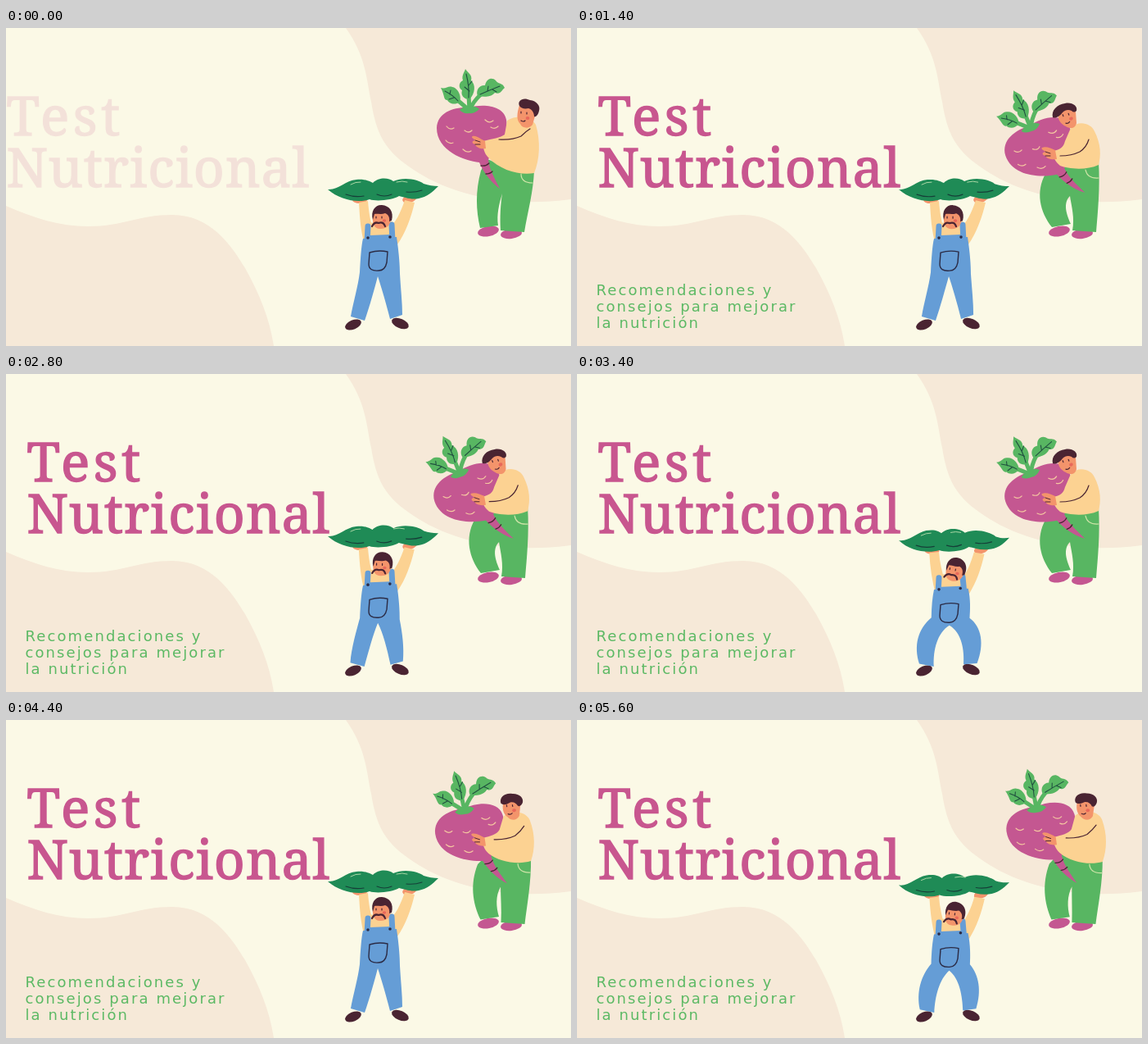
These frames come from a looping animation (690 by 388 pixels, 5700 ms). An HTML page with a canvas:

```html
<!DOCTYPE html>
<html lang="es">
<head>
<meta charset="utf-8">
<title>Test Nutricional</title>
<style>
  html, body { margin: 0; width: 100%; height: 100%; overflow: hidden; background: #fbf9e6; }
  canvas, svg { position: absolute; left: 0; top: 0; width: 690px; height: 388px; }
  #title { font: 500 66px "Noto Serif", serif; fill: #c8568f; stroke: #c8568f; stroke-width: 1.4px; letter-spacing: 1px; }
  #title .wide { letter-spacing: 4.4px; }
  #sub { font: 18px "DejaVu Sans", sans-serif; fill: #5cb964; letter-spacing: 2.1px; }
</style>
</head>
<body>
<canvas id="stage" width="690" height="388"></canvas>
<svg viewBox="0 0 690 388">
  <g id="title"><text class="wide" x="25.5" y="131">Test</text><text x="25.5" y="193.5">Nutricional</text></g>
  <g id="sub"><text x="23.5" y="326">Recomendaciones y</text><text x="23.5" y="346">consejos para mejorar</text><text x="23.5" y="365.5">la nutrición</text></g>
</svg>
<script>
const LOOP = 5700, STEP = 100;
const CREAM = '#fbf9e6', BEIGE = '#f6e9d8', GREEN = '#58b662', POD = '#1f8b56', PINK = '#c45791',
      BLUE = '#659dd6', YELLOW = '#fcd292', SKIN = '#f3946b', DARK = '#4a2432', INK = '#2b2b45';
const ctx = document.getElementById('stage').getContext('2d');
const title = document.getElementById('title'), sub = document.getElementById('sub');
let k = 0; // 0 standing, 1 crouching

const clamp = v => Math.min(1, Math.max(0, v));
const lerp = (a, b) => a + (b - a) * k;
const smooth = (a, b, v) => { const u = clamp((v - a) / (b - a)); return u * u * (3 - 2 * u); };
// sink, stay low, rise again
const squat = (t, period) => {
  const u = t % period / period;
  return smooth(.067, .474, u) - smooth(.763, .98, u);
};

// blend two path strings that share the same commands
function blend(a, b) {
  if (!b) return new Path2D(a);
  const num = /-?[\d.]+/g, to = b.match(num);
  let i = 0;
  return new Path2D(a.replace(num, v => (+v + (to[i++] - v) * k).toFixed(2)));
}
function fill(color, a, b) {
  ctx.fillStyle = color;
  ctx.fill(blend(a, b));
}
function line(color, width, a, b) {
  ctx.strokeStyle = color;
  ctx.lineWidth = width;
  ctx.stroke(blend(a, b));
}
function oval(color, x, y, rx, ry, turn = 0) {
  ctx.fillStyle = color;
  ctx.beginPath();
  ctx.ellipse(x, y, rx, ry, turn, 0, 7);
  ctx.fill();
}
// draw a rigid part around (x, y), moved by (dx, dy) and turned as k grows
function part(x, y, dx, dy, turn, draw) {
  ctx.save();
  ctx.translate(x + dx * k, y + dy * k);
  ctx.rotate(turn * k);
  ctx.translate(-x, -y);
  draw();
  ctx.restore();
}

function backdrop() {
  ctx.fillStyle = CREAM;
  ctx.fillRect(0, 0, 690, 388);
  fill(BEIGE, 'M415 0 C440 35 440 62 446 90 C452 128 462 148 492 169 C525 193 590 222 690 209 V0 Z');
  fill(BEIGE, 'M0 217 C35 232 65 242 100 242 C145 242 160 228 203 228 C250 228 275 265 292 293 C310 325 322 355 327 388 H0 Z');
}

function podMan() {
  oval(DARK, 424, 362, 10.5, 5.6, -.4);
  oval(DARK, 481.5, 360.5, 11, 5.8, .4);

  oval(SKIN, lerp(432, 434), lerp(210, 217.5), 9, 4);
  oval(SKIN, lerp(493, 494), lerp(208, 216), 9, 5, -.3);
  fill(YELLOW, 'M431 213 L442 211 C443 225 445 235 448 246 L438 264 C433 248 432 230 431 213 Z',
               'M430 220 L442 219 C443 232 446 244 450 256 L438 270 C434 255 431 238 430 220 Z');
  fill(YELLOW, 'M487 210 L499 213 C495 230 488 250 478 264 L466 246 C476 238 482 225 487 210 Z',
               'M484 220 L497 222 C493 240 488 255 479 270 L468 256 C476 245 481 232 484 220 Z');
  fill(YELLOW, 'M440 238 L472 236 L477 262 L436 262 Z', 'M440 247 L474 246 L478 268 L436 268 Z');

  fill(BLUE,
    'M436 257 L477 255 C480 275 481 290 481 300 C482 318 484 335 484 350 L469 355 C464 335 458 315 454 303 C450 318 444 340 438 357 L421 352 C424 335 430 315 432 298 C433 280 434 265 436 257 Z',
    'M436 265 L478 264 C481 275 480 287 479 297 C498 306 502 328 490 354 L473 354 C476 338 474 316 455 308 C437 315 432 335 435 357 L417 354 C407 330 412 310 433 297 C433 285 434 275 436 265 Z');
  fill(BLUE, 'M444 253 L469 252 L475 262 L438 262 Z', 'M445 262 L469 261 L476 270 L438 270 Z');
  line(BLUE, 7, 'M442 242 L441 261', 'M442 251 L441 269');
  line(BLUE, 7, 'M471 240 L472 260', 'M471 250 L473 268');
  line(INK, 1.4,
    'M444 274 Q455 270.5 466 273 L465 286 Q463 296 455 296 Q443 297 443 288 Z',
    'M444 284 Q455 280.5 466 283 L465 295 Q463 305 455 305.5 Q443 306 443 297 Z');
  oval(INK, 442, lerp(256, 265), 1.8, 1.8);
  oval(INK, lerp(469, 468), lerp(255, 263.5), 1.8, 1.8);

  part(459, 232, 4, 10.5, .25, () => {
    fill(SKIN, 'M448 228 C447 238 449 245 457 245 C466 245 470 240 470 230 L466 222 L452 222 Z');
    fill(DARK, 'M448 234 C445 223 451 215.5 459 216 C468 216.5 474 224 471 235 L468 236 C469 230 466 227 463 226 C458 228 453 226 450 227 Z');
    oval('#e8685a', 462, 235, 2.2, 1.8);
    line(DARK, 1.2, 'M452 230 l0 2 M459 230 l0 2');
    line(DARK, 2.2, 'M447 242 Q450 236 455 238 Q461 236 463 242');
  });

  fill(POD,
    'M393 197 C406 198 414 186 428 185 C438 184 444 187 448 189 C456 181 468 183 473 187 C486 181 504 185 510 190 C516 192 522 193 528 193 C520 201 514 206 504 208 C494 210 486 206 480 205 C472 210 452 212 444 209 C430 214 408 210 393 197 Z',
    'M393 205 C406 207 414 196 426 193 C436 191 441 193 444 196 C452 188 468 190 474 196 C486 190 504 195 512 201 C518 203 522 203 528 202 C520 211 512 216 502 216 C492 217 484 214 478 213 C470 219 450 220 442 217 C428 221 406 218 393 205 Z');
  line('#163f38', 1.2,
    'M415 203 Q426 207 437 205 M453 203 Q462 207 471 203 M489 200 Q499 201 508 198',
    'M414 211 Q425 215 436 212 M451 211 Q460 214 469 210 M486 208 Q496 210 506 207');
  line('#a9d6a4', 1, 'M421 191 Q427 187.5 433 188 M477 188 Q484 186 490 188',
                     'M420 199 Q426 196 432 196 M450 195 Q456 193.5 462 195');
}

function beet() {
  line(GREEN, 5, 'M566 101 Q560 95 550 87 M566 101 L565 82 M566 101 Q570 90 580 81');
  fill(GREEN, 'M554 90 C548 95 541 92 539 88 C534 88 536 82 531 73 C537 75 540 70 545 72 C552 73 557 84 554 90 Z');
  fill(GREEN, 'M566 87 C559 87 555 82 557 76 C552 73 553 66 558 64 C556 58 560 54 561 50 C564 55 570 57 568 64 C574 69 573 80 566 87 Z');
  fill(GREEN, 'M576 83 C573 75 579 69 585 70 C587 61 594 60 598 64 C601 69 606 66 609 73 C605 76 604 82 597 79 C592 85 583 84 576 83 Z');
  line('#20503f', 1.1, 'M536 77 Q546 82 552 89 M542 81 l1 -5 M547 85 l-6 2 M562 56 Q566 72 565 85 M565 70 l4 -5 M566 77 l-6 -5 M579 81 Q590 76 603 71 M588 77 l1 -6 M594 75 l5 3');
  fill(PINK, 'M566 97 C582 92 608 94 611 112 C614 130 602 148 589 160 C590 172 596 182 603 196 C592 188 583 176 578 164 C560 162 526 150 526 122 C527 102 548 96 566 97 Z');
  fill(GREEN, 'M554 100 Q560 95 566 96 Q573 94 578 99 Q572 105 566 104 Q558 105 554 100 Z');
  line('#f4c6a0', 1.2, 'M538 120 q4 5 9 2 M560 125 q5 4 9 0 M585 112 q5 5 10 1 M592 121 q5 3 9 -1 M537 137 q4 5 9 3 M558 148 q5 5 10 2');
  line(DARK, 1.3, 'M580 168 Q586 169 590 165 M586 178 Q591 178 594 175');
}

function beetMan() {
  oval(PINK, 589, 248, 13, 6.2, -.2);
  oval(PINK, 617, 251, 13, 6, -.12);
  fill(GREEN,
    'M588 160 C615 172 632 176 645 174 C644 200 637 225 633 249 L604 247 C603 230 604 215 606 202 C602 215 599 228 601 241 L579 244 C574 222 573 200 580 174 Z',
    'M590 166 C605 171 625 170 637 163 C639 195 636 225 634 249 L605 247 C608 232 604 218 602 205 C593 214 598 228 603 239 L580 243 C565 224 560 200 572 178 Z');
  line('#cfe4a8', 1.2, 'M629 178 Q629 189 643 189', 'M621 173 Q623 184 637 183');

  part(566, 100, -12, 22, -.33, beet);

  fill(YELLOW,
    'M612 113 C624 105 642 108 647 118 C653 138 652 160 645 177 C628 180 604 174 589 158 C584 153 582 146 583 138 C594 135 604 134 609 130 Z',
    'M603 122 C612 112 628 116 632 126 C640 142 640 155 637 167 C622 174 600 172 590 168 C584 163 580 156 582 150 C590 148 594 146 596 138 Z');
  line(DARK, 1.2, 'M640 123 Q635 126 629 132 Q618 137 602 136', 'M625 136 Q622 146 614 151 Q604 156 590 156');

  fill(SKIN,
    'M585 138 C580 136 575 131 570 132 C567 133 571 135 573 137 C568 138 569 141 573 142 C574 146 580 148 586 147 Z',
    'M584 149 C579 147 573 144 568 146 C566 148 570 149 572 151 C567 152 568 155 572 156 C574 160 580 161 586 160 Z');
  line(DARK, 1, 'M573 137 l6 2 M573 142 l6 0', 'M572 151 l6 2 M572 156 l6 0');

  fill(SKIN,
    'M627 94 C624 104 623 112 628 117 C630 122 638 124 643 118 L647 104 L643 94 Z',
    'M588 103 C586 110 590 117 597 120 C603 124 609 122 610 116 L609 102 L600 96 Z');
  fill(DARK,
    'M627 95 C624 88 632 84 640 88 C648 89 653 95 651 101 C650 106 647 109 645 108 C645 103 642 99 638 98 C633 99 629 98 627 95 Z',
    'M581 109 C579 101 586 93 596 92 C604 90 612 95 610 101 C608 103 606 103 604 101 C600 99 596 100 593 103 C590 107 585 111 581 109 Z');
  part(633, 108, -34, 2, -.35, () => {
    oval('#e8685a', 637, 110, 2.4, 2);
    line(DARK, 1.2, 'M629 102 l0 2 M636 103 l0 2 M629 113 q3 2 5 0');
  });
}

function enter(el, p, shift, from) {
  const e = 1 - (1 - clamp(p)) ** 2;
  el.setAttribute('transform', `translate(${(-shift * (1 - e)).toFixed(2)} 0)`);
  el.setAttribute('opacity', p < 0 ? 0 : from + (1 - from) * e);
}

function frame(now) {
  const t = Math.floor(now % LOOP / STEP) * STEP;
  ctx.lineCap = ctx.lineJoin = 'round';
  backdrop();
  k = squat(t, 1940);
  beetMan();
  k = squat(t, 1450);
  podMan();
  enter(title, t / 600, 25, .14);
  enter(sub, (t - 100) / 600, 25, .05);
}

const start = performance.now();
function tick() {
  frame(performance.now() - start);
  requestAnimationFrame(tick);
}
tick();
</script>
</body>
</html>
```
